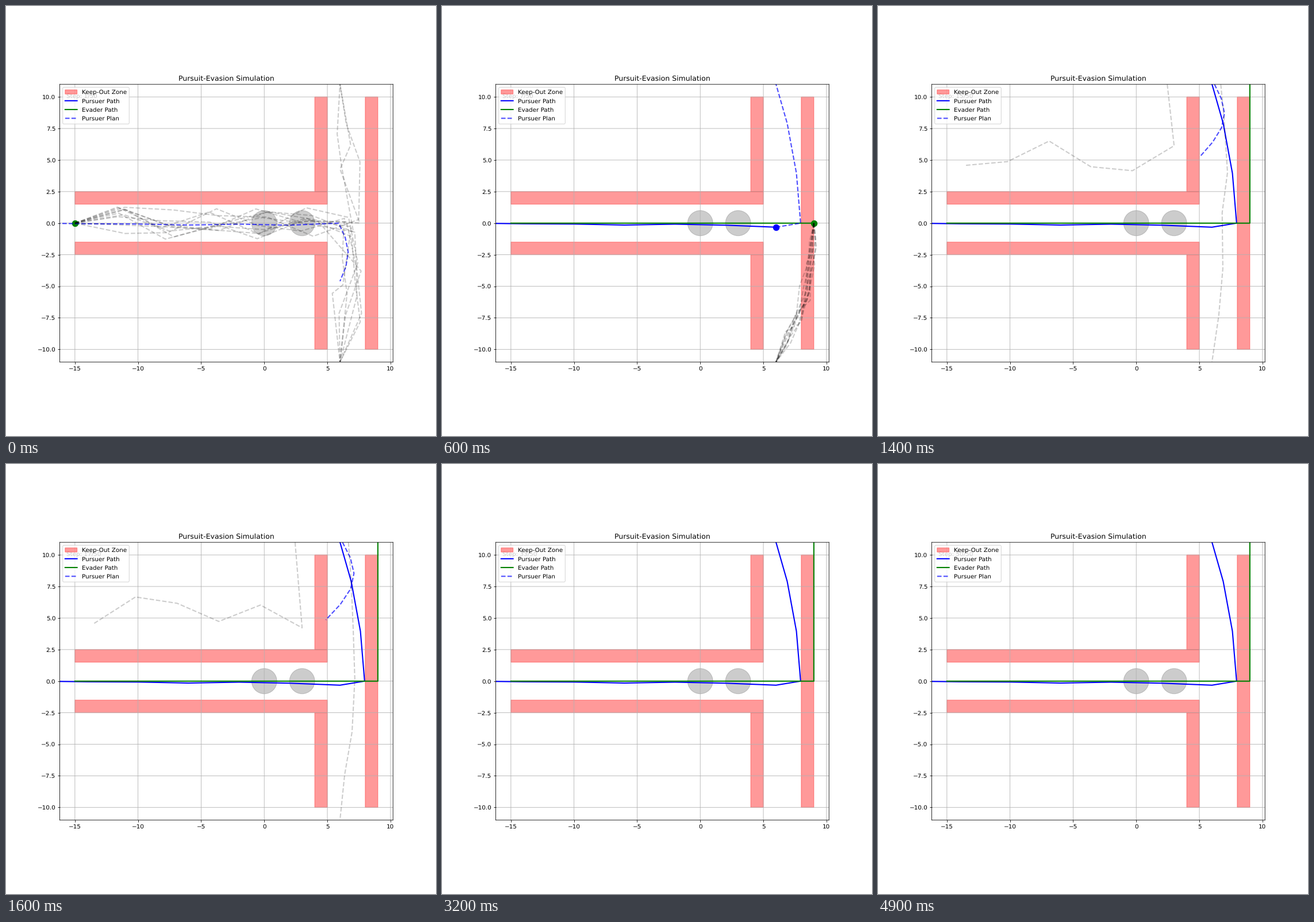
These frames come from a looping animation (748 px wide and 748 px high, 5 s). A matplotlib script:

```python
import random
from math import pi, sin

import matplotlib.pyplot as plt
from matplotlib.animation import FuncAnimation
from matplotlib.patches import Circle, Rectangle

STEPS, GUESS_COUNT, SPEED, TOP = 50, 10, 4, 11
UP, DOWN = (6, TOP), (6, -TOP)
JUNCTION_STEP, EXIT_STEP = 6, 11

# Both run along the corridor, then climb the side passage out of view.
SWAY = (0, -.05, -.07, -.15, -.08, -.16, -.32)
PURSUER = ([(-18 + SPEED * i, y) for i, y in enumerate(SWAY)]
           + [(7.95 - .13 * i - .2 * i * i, 3.95 * i) for i in range(5)])
EVADER = ([(-15 + SPEED * i, 0) for i in range(JUNCTION_STEP + 1)]
          + [(9, SPEED * i) for i in range(1, 6)])


def arc(start, end, bulge, count):
    """Points from start to end, bowed sideways by a half sine."""
    (x0, y0), (x1, y1) = start, end
    parts = [i / (count - 1) for i in range(count)]
    return [(x0 + (x1 - x0) * t + bulge * sin(pi * t), y0 + (y1 - y0) * t)
            for t in parts]


def corridor_route(start, goal, rng):
    """Zigzag along the corridor, then turn towards one of the exits."""
    route = [start]
    while route[-1][0] < 4:
        route.append((route[-1][0] + rng.uniform(3.3, 4),
                      rng.uniform(-1.3, 1.3)))
    for low in (.2, .5):
        route.append((rng.uniform(5.3, 7.8),
                      goal[1] * rng.uniform(low, low + .25)))
    return route + [goal]


def channel_route(start, goal, rng):
    """Run down the side passage with a slight bow and uneven spacing."""
    bowed = arc(start, goal, rng.uniform(.6, 1.1), 7)
    inner = [(x + rng.uniform(-.3, .3), y + rng.uniform(-.7, .7))
             for x, y in bowed[1:-1]]
    return [start] + inner + [goal]


def leftward_route(rng):
    return [(2.4, 11.5)] + [(3 - 3.3 * i, rng.uniform(3.8, 6.8))
                            for i in range(6)]


def dip(x, rng):
    """Short stretch that barely reaches below the upper edge."""
    drift, depth = rng.uniform(-2.8, 1), rng.uniform(.4, 2.8)
    return [(x, TOP + .2), (x + drift, TOP - depth),
            (x + 2 * drift, TOP - depth - rng.uniform(-.5, .5))]


def predicted_routes(step):
    rng = random.Random(step)
    if step < JUNCTION_STEP:
        return [corridor_route(EVADER[step], UP if i < 3 else DOWN, rng)
                for i in range(GUESS_COUNT)]
    if step < EXIT_STEP:
        return [channel_route(EVADER[step], DOWN, rng)
                for _ in range(2 * (EXIT_STEP - step))]
    if step < 19:
        routes = [channel_route((6.6, 12), DOWN, rng)]
        return routes + [leftward_route(rng)] if step > 12 else routes
    if step < 25:
        return [dip(x, rng) for x in (-6, -1, 4, 9)]
    return []


def pursuer_plan(step):
    if step < 5:
        return PURSUER[step:6] + arc((5.9, -.53 * step), (6, -4.6), .7, 5)
    if step < EXIT_STEP:
        return PURSUER[step:step + 5]
    if step < 22:
        depth = 6.2 * sin(pi * (step - 9.5) / 12)
        x = 6.2 - .8 * max(0, step - 16)
        return arc((x, TOP), (x - .035 * depth ** 2, TOP - depth),
                   .04 * depth ** 2, 6)
    return []


plt.rcParams.update({"text.hinting": "none", "path.snap": False})
fig, ax = plt.subplots(figsize=(10, 10), dpi=74.8)
ax.set(xlim=(-16.2, 10.2), ylim=(-TOP, TOP), aspect="equal",
       xticks=range(-15, 11, 5), yticks=[2.5 * i for i in range(-4, 5)])
ax.set_title("Pursuit-Evasion Simulation")
ax.grid(True)

walls = [(-15, 1.5, 20, 1), (-15, -2.5, 20, 1), (4, 2.5, 1, 7.5),
         (4, -10, 1, 7.5), (8, -10, 1, 20)]
for i, (x, y, width, height) in enumerate(walls):
    ax.add_patch(Rectangle((x, y), width, height, color="red", alpha=.4,
                           label="Keep-Out Zone" if i == 0 else None))
for x in (0, 3):
    ax.add_patch(Circle((x, 0), 1, color="gray", alpha=.4))

pursuer_path, = ax.plot([], [], "b-", lw=2, label="Pursuer Path")
evader_path, = ax.plot([], [], "g-", lw=2, label="Evader Path")
pursuer_dot, = ax.plot([], [], "bo", ms=10)
evader_dot, = ax.plot([], [], "go", ms=10)
plan_line, = ax.plot([], [], "b--", lw=2, alpha=.7, label="Pursuer Plan")
guess_lines = [ax.plot([], [], "k--", lw=2, alpha=.2)[0]
               for _ in range(GUESS_COUNT)]
step_text = ax.text(.02, .95, "", transform=ax.transAxes)
ax.legend(loc="upper left", labelspacing=.54)


def place(line, points):
    line.set_data([p[0] for p in points], [p[1] for p in points])


def update(step):
    for points, path, dot in ((PURSUER, pursuer_path, pursuer_dot),
                              (EVADER, evader_path, evader_dot)):
        travelled = points[:step + 1]
        place(path, travelled)
        place(dot, travelled[-1:])
    place(plan_line, pursuer_plan(step))
    routes = predicted_routes(step)
    for i, line in enumerate(guess_lines):
        place(line, routes[i] if i < len(routes) else [])
    step_text.set_text(f"Step: {step + 1}/{STEPS}")
    return [pursuer_path, evader_path, pursuer_dot, evader_dot, plan_line,
            *guess_lines, step_text]


animation = FuncAnimation(fig, update, frames=STEPS, interval=100,
                          repeat=True, repeat_delay=0)
plt.show()
```
